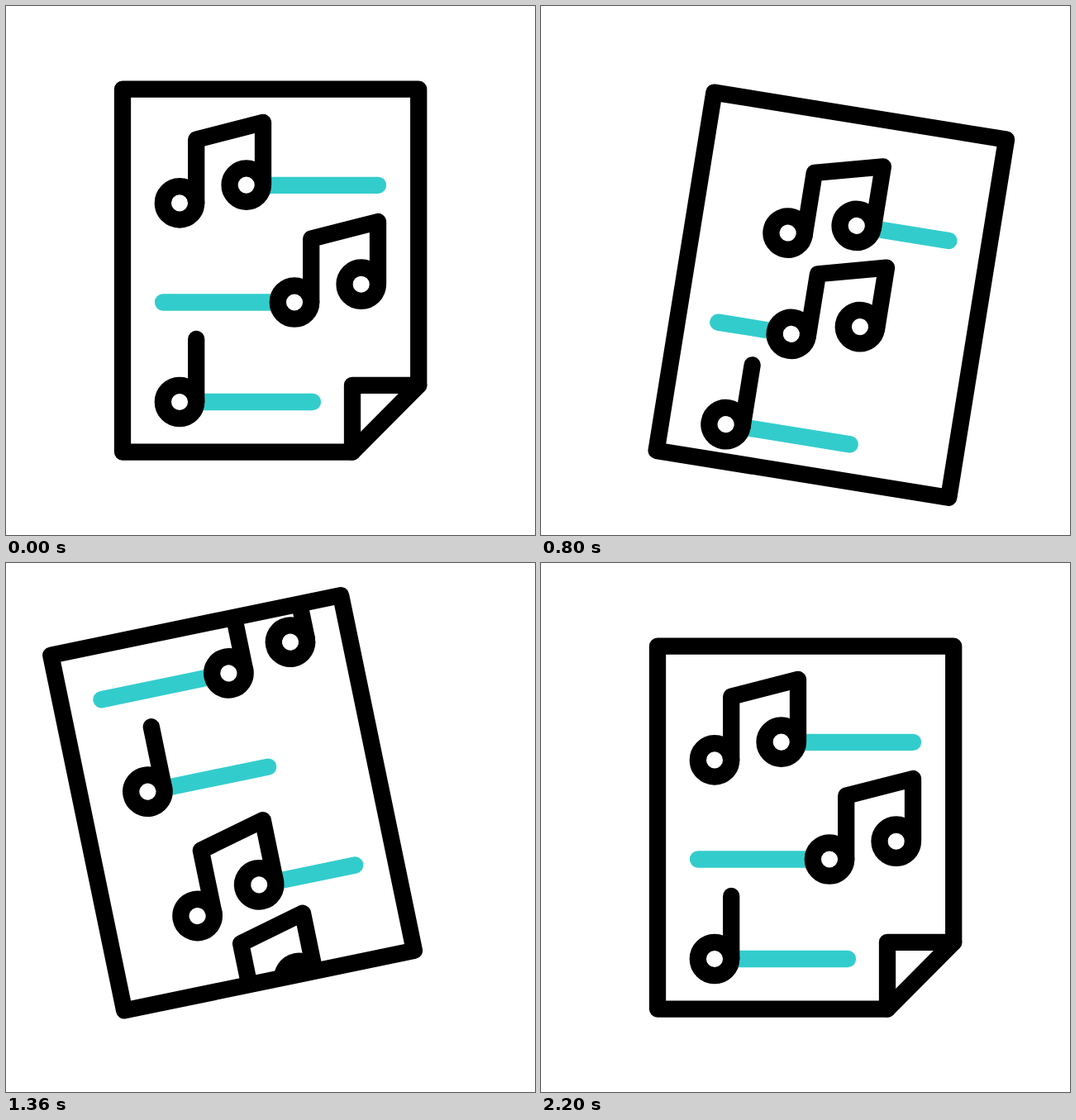
Write an HTML page that moves like this. It is 640 px wide and 640 px high and loops after 2.4 s.

```html
<!DOCTYPE html>
<html lang="en">
<head>
<meta charset="utf-8">
<title>Sheet music</title>
<style>
  html, body { margin: 0; width: 100%; height: 100%; overflow: hidden; background: #fff; }
  svg { display: block; width: 100vw; height: 100vh; }
  .ink, .line { fill: none; stroke-width: 20.3; stroke-linecap: round; stroke-linejoin: round; }
  .ink { stroke: #000; }
  .line { stroke: #33cccc; }
  .head { fill: #fff; }
</style>
</head>
<body>
<svg viewBox="0 0 640 640">
  <defs>
    <clipPath id="inside"><path d="M141 100.7H499.2V539.6H141Z"/></clipPath>
    <g id="pair" class="ink">
      <path d="M20.2 0V-76.8L101-97.5V-21.8"/>
      <circle class="head" r="20.2"/>
      <circle class="head" cx="80.7" cy="-21.8" r="20.2"/>
    </g>
    <g id="single" class="ink">
      <path d="M20.2 0V-76"/>
      <circle class="head" r="20.2"/>
    </g>
  </defs>
  <g id="page">
    <g clip-path="url(#inside)"><g id="score"></g></g>
    <path id="flap" class="ink" fill="#fff"/>
    <path id="sheet" class="ink"/>
  </g>
</svg>
<script>
const LOOP = 2400;
const PERIOD = 400;
const SVG = 'http://www.w3.org/2000/svg';
const $ = id => document.getElementById(id);

// Tracks are lists of [ms, value], eased between neighbours.
const tilt = [[350, 0], [805, 9.15], [1412, -12.05], [1705, -10.3], [2200, 0]];
const scroll = [[220, 0], [675, 25], [2025, -PERIOD]];
const unfold = [[230, 0], [750, 1], [1670, 1], [2180, 0]];

// Each staff row: note position, line from the note (offset) to a fixed end, sideways slide.
const rows = [
  { note: 'pair', x: 210, y: 238.4, from: 101, end: 450, lineY: 216.8,
    slide: [[205, 0], [700, 50], [715, 50], [1195, 0]] },
  { note: 'pair', x: 349, y: 358.5, from: -20, end: 190, lineY: 358.5,
    slide: [[390, 0], [890, -75], [910, -75], [1410, 0]] },
  { note: 'single', x: 210, y: 479, from: 20, end: 371, lineY: 479,
    slide: [[602, 0], [1102, 26], [1602, 0]] }
];
const arrivals = [
  [[1225, 48.5], [1745, 0]],
  [[1320, -75], [1825, 0]],
  [[1685, 51], [2200, 0]]
];
const nextRows = rows.map((row, i) => ({
  ...row, y: row.y + PERIOD, lineY: row.lineY + PERIOD, slide: arrivals[i]
}));

function valueAt(track, t) {
  if (t <= track[0][0]) return track[0][1];
  for (let i = 1; i < track.length; i++) {
    const [t0, a] = track[i - 1], [t1, b] = track[i];
    if (t < t1) return a + (b - a) * (1 - Math.cos(Math.PI * (t - t0) / (t1 - t0))) / 2;
  }
  return track[track.length - 1][1];
}

function add(tag, attrs) {
  const el = document.createElementNS(SVG, tag);
  for (const key in attrs) el.setAttribute(key, attrs[key]);
  return $('score').appendChild(el);
}

const staff = [...rows, ...nextRows].map(row => ({
  ...row,
  line: add('path', { class: 'line' }),
  glyph: add('use', { href: '#' + row.note })
}));

function drawSheet(p) {
  const x = 419 + 80.2 * p, y = 458.8 + 80.8 * p;
  const corner = `419 539.6L${x} ${y}L499.2 458.8`;
  const folded = p < 0.5;
  $('sheet').setAttribute('d', folded
    ? 'M141 100.7H499.2V458.8L419 539.6H141Z'
    : `M141 539.6L${corner}V100.7H141Z`);
  $('flap').setAttribute('d', folded ? `M${corner}` : '');
}

function draw(t) {
  $('page').setAttribute('transform', `rotate(${valueAt(tilt, t)} 151 530)`);
  $('score').setAttribute('transform', `translate(0 ${valueAt(scroll, t)})`);
  for (const { line, glyph, x, y, from, end, lineY, slide } of staff) {
    const left = x + valueAt(slide, t);
    line.setAttribute('d', `M${left + from} ${lineY}H${end}`);
    glyph.setAttribute('transform', `translate(${left} ${y})`);
  }
  drawSheet(valueAt(unfold, t));
}

const start = performance.now();
function tick() {
  draw((performance.now() - start) % LOOP);
  requestAnimationFrame(tick);
}
tick();
</script>
</body>
</html>
```
